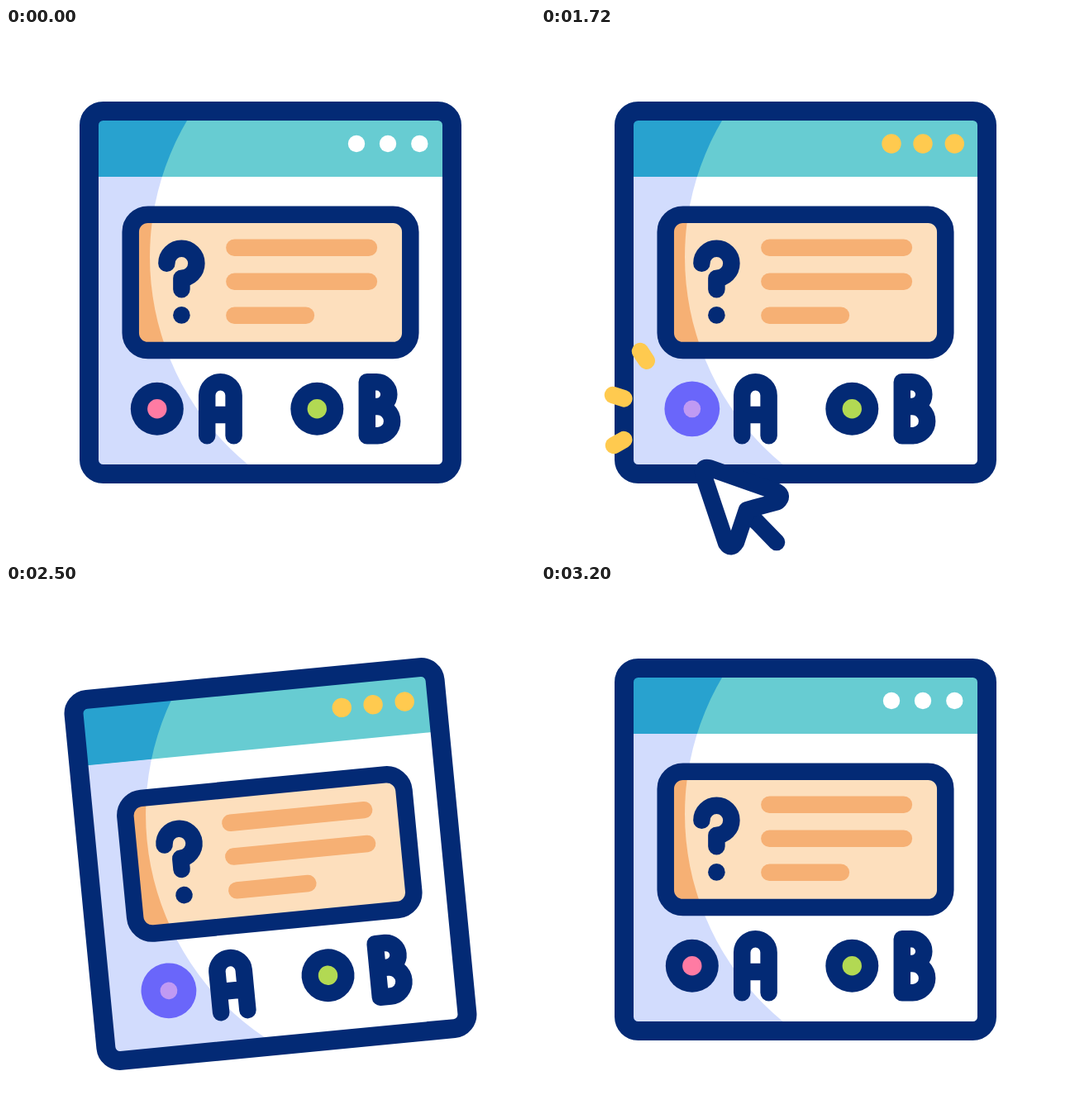
An HTML page for the animation above (3300 ms loop, 640x640 px).

```html
<!DOCTYPE html>
<html lang="en">
<head>
<meta charset="utf-8">
<title>Quiz window</title>
<style>
html, body { margin: 0; width: 100%; height: 100%; overflow: hidden; background: #fff; }
svg { display: block; width: 100%; height: 100%; }
.line { fill: none; stroke: #032a75; stroke-width: 20.5; stroke-linecap: round; stroke-linejoin: round; }
.bar { stroke: #f6b074; }
.spark { stroke: #ffca4f; }
.ink { fill: #032a75; }
</style>
</head>
<body>
<svg viewBox="0 0 640 640">
  <defs>
    <clipPath id="inWindow"><rect x="100.5" y="100.5" width="439" height="439" rx="17"/></clipPath>
    <clipPath id="inPanel"><rect x="150.7" y="225.7" width="338.6" height="164.4" rx="21"/></clipPath>
    <mask id="shade">
      <rect width="640" height="640" fill="#fff"/>
      <circle cx="499" cy="277" r="325" fill="#000"/>
      <rect x="540" width="100" height="640" fill="#000"/>
      <rect x="330" width="310" height="640" fill="#000"/>
    </mask>
  </defs>
  <g id="window">
    <g clip-path="url(#inWindow)">
      <rect x="100" y="100" width="440" height="440" fill="#fff"/>
      <rect x="100" y="100" width="440" height="80" fill="#67ccd2"/>
      <g mask="url(#shade)">
        <rect x="100" y="180" width="440" height="360" fill="#d2dcfd"/>
        <rect x="100" y="100" width="440" height="80" fill="#28a2cf"/>
      </g>
    </g>
    <rect class="line" x="100.5" y="100.5" width="439" height="439" rx="17" style="stroke-width:23"/>
    <g id="dots"><circle cx="424" cy="140"/><circle cx="462" cy="140"/><circle cx="500.3" cy="140"/></g>

    <g clip-path="url(#inPanel)">
      <rect x="150" y="225" width="340" height="166" fill="#fddfbd"/>
      <rect x="150" y="225" width="340" height="166" fill="#f6b074" mask="url(#shade)"/>
    </g>
    <rect class="line" x="150.7" y="225.7" width="338.6" height="164.4" rx="21"/>
    <g id="bars"></g>

    <circle id="ring" cx="182.8" cy="460.8"/>
    <circle id="core" cx="182.8" cy="460.8"/>
    <circle class="ink" cx="376.3" cy="460.8" r="32"/>
    <circle cx="376.3" cy="460.8" r="11.7" fill="#b2d953"/>
    <path class="line" d="M243.2 493.2V444.5a16.2 16.2 0 0 1 32.4 0V493.2M243.2 468h32.4"/>
    <path class="line" d="M436.8 428.3h11.6a14.9 14.9 0 0 1 0 29.8h1.2a17.55 17.55 0 0 1 0 35.1h-12.8zM436.8 458.1h12"/>

    <g id="question">
      <path class="line" d="M194.4 284.8a18 18 0 1 1 18 18v13.4"/>
      <circle class="ink" cx="212.4" cy="347.4" r="10.3"/>
    </g>
  </g>
  <g id="sparks"></g>
  <g id="cursor">
    <path class="line" d="M249 585L285 622"/>
    <path class="line" style="fill:#fff" d="M196.5 541L224 623Q230 632 236 622L249 583L286 573Q294 566 285 561L204 532.5Q194 530 196.5 541Z"/>
  </g>
</svg>
<script>
const LOOP = 3300, STEP = 20;
const $ = id => document.getElementById(id);
const set = (el, attrs) => { for (const k in attrs) el.setAttribute(k, attrs[k]); };
const mix = (a, b, p) => a + (b - a) * p;
const mixColor = (a, b, p) => `rgb(${a.map((v, i) => Math.round(mix(v, b[i], p)))})`;

// Eased value at time t from [time, value] keys
function at(t, ...keys) {
  if (t <= keys[0][0]) return keys[0][1];
  for (let i = 1; i < keys.length; i++) {
    const [t0, a] = keys[i - 1], [t1, b] = keys[i];
    if (t < t1) {
      const s = (t - t0) / (t1 - t0);
      return mix(a, b, s * s * (3 - 2 * s));
    }
  }
  return keys[keys.length - 1][1];
}

function addLine(parent, kind) {
  const el = document.createElementNS('http://www.w3.org/2000/svg', 'line');
  el.setAttribute('class', 'line ' + kind);
  return $(parent).appendChild(el);
}

const bars = [[265.8, 162.5], [306.8, 162.5], [347.8, 86.5]]
  .map(([y, len]) => ({ y, len, el: addLine('bars', 'bar') }));

// Outer end and inward direction of each spark
const sparks = [[120, 391, .55, .83], [87, 444, .95, .31], [88, 505, .87, -.49]]
  .map(pos => ({ pos, el: addLine('sparks', 'spark') }));

function draw(t) {
  const angle = at(t, [1800, 0], [2200, 8], [2600, -8], [3000, 0]);
  const drop = at(t, [1800, 0], [2000, 35], [2200, 0], [2400, 35], [2600, 0], [2800, 35], [3000, 0]);
  set($('window'), { transform: `translate(0 ${drop}) rotate(${angle} 320 320)` });

  const zoom = t ? at(t, [0, 3.3], [700, 1]) : 1;
  set($('question'), { transform: `translate(215 317) scale(${zoom}) translate(-215 -317)` });

  const grown = t ? at(t, [200, 0], [900, 1]) : 1;
  for (const { y, len, el } of bars)
    set(el, { x1: 276.4, x2: 276.4 + len * grown, y1: y, y2: y, visibility: grown ? 'visible' : 'hidden' });

  const lit = t >= 1100 && t < 3200 && Math.floor((t - 1100) / 300) % 2 === 0;
  set($('dots'), { fill: lit ? '#ffca4f' : '#fff' });
  for (const dot of $('dots').children) set(dot, { r: lit ? 11.7 : 10.2 });

  const picked = at(t, [1200, 0], [1400, 1], [2800, 1], [3000, 0]);
  set($('ring'), { r: mix(32, 33.4, picked), fill: mixColor([3, 42, 117], [106, 102, 250], picked) });
  set($('core'), { r: mix(11.7, 10.4, picked), fill: mixColor([255, 123, 163], [192, 154, 243], picked) });

  const head = at(t, [1400, 40], [1600, 0]), tail = at(t, [1600, 40], [1800, 0]);
  for (const { pos: [x, y, dx, dy], el } of sparks)
    set(el, {
      x1: x + dx * head, y1: y + dy * head, x2: x + dx * tail, y2: y + dy * tail,
      visibility: t > 1400 && t < 1800 ? 'visible' : 'hidden'
    });

  const away = at(t, [700, 1], [1100, 0], [1600, 0], [2000, 1]);
  set($('cursor'), { transform: `translate(${102 * away - 22} ${177 * away - 38.2})` });
}

const start = performance.now();
function tick(now) {
  const t = Math.max(0, now - start) % LOOP;
  draw(Math.floor(t / STEP) * STEP);
  requestAnimationFrame(tick);
}
draw(0);
requestAnimationFrame(tick);
</script>
</body>
</html>
```
